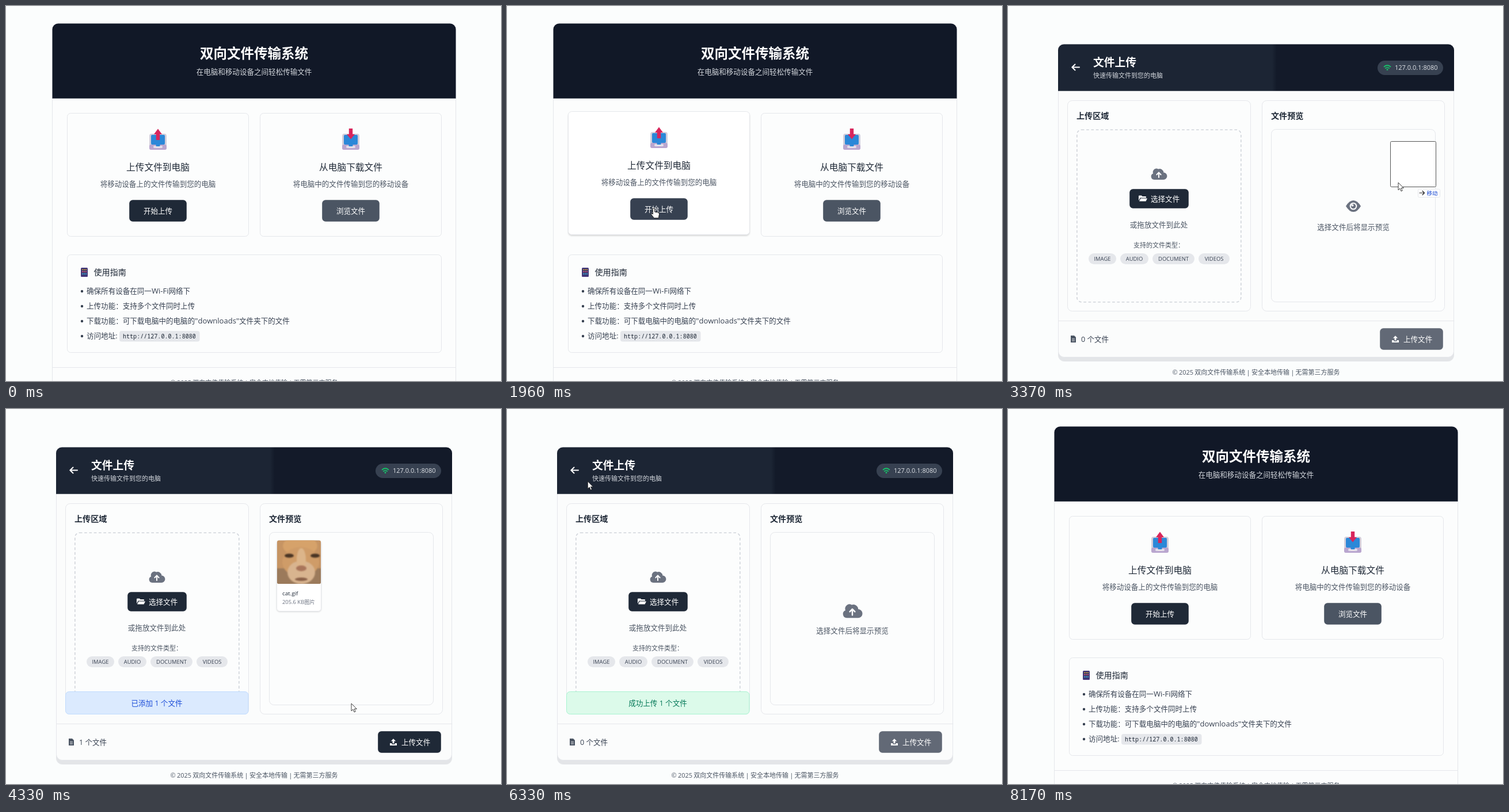
These frames come from a looping animation (860 px wide and 652 px high, 8.42 s). An HTML page:

```html
<!DOCTYPE html>
<html lang="zh-CN">
<head>
<meta charset="utf-8">
<title>双向文件传输系统</title>
<style>
html, body { margin: 0; width: 100%; height: 100%; overflow: hidden; background: #fbfdfd; }
svg { display: block; width: 860px; height: 652px; }
text { font-family: "Open Sans", "Noto Sans CJK SC", "Noto Sans CJK", sans-serif; font-kerning: none; white-space: pre; }
.mid { text-anchor: middle; }
.bold { font-weight: 700; }
.medium { font-weight: 500; }
.mono { font-family: "Noto Sans Mono", monospace; }
.foot { word-spacing: -0.6px; }
.lift { transform: translateY(-3px); }
.lift .box { fill: #fff; filter: drop-shadow(0 2.5px 1px #0002); }
.thumb { filter: drop-shadow(0 1px 1px #0002); }
.panel { filter: drop-shadow(0 7px 0.5px #e3e5e8); }
.soft { filter: blur(1.3px); }
</style>
</head>
<body>
<svg id="stage" viewBox="0 0 860 652"></svg>
<script>
const LOOP = 8420;
const INK = '#1f2937', BODY = '#374151', SOFT = '#4b5563', GREY = '#6b7280', LINE = '#e5e7eb';

// Text placed by its vertical centre.
const text = (x, cy, size, str, fill, cls = '', id = '') =>
  `<text id="${id}" class="${cls}" x="${x}" y="${cy + size * 0.375}" font-size="${size}" fill="${fill}">${str}</text>`;
const rect = (x, y, w, h, r, fill, more = '') =>
  `<rect x="${x}" y="${y}" width="${w}" height="${h}" rx="${r}" fill="${fill}" ${more}/>`;
const frame = (x, y, w, h, r, fill = '#fcfdfd', more = '') =>
  rect(x + 0.5, y + 0.5, w, h, r, fill, `stroke="${LINE}" ${more}`);
const button = (id, x, y, w, h, fill) => rect(x + 0.2, y + 0.2, w - 0.4, h - 0.4, 6, fill, `id="${id}"`);
const path = (d, fill, more = '') => `<path d="${d}" fill="${fill}" ${more}/>`;
const stroke = (d, color, width) =>
  path(d, 'none', `stroke="${color}" stroke-width="${width}" stroke-linecap="round" stroke-linejoin="round"`);
const ellipse = (x, y, rx, ry, fill) => `<ellipse cx="${x}" cy="${y}" rx="${rx}" ry="${ry}" fill="${fill}"/>`;
const at = (x, y, inner, scale = 1) => `<g transform="translate(${x} ${y}) scale(${scale})">${inner}</g>`;
const group = (id, inner) => `<g id="${id}">${inner}</g>`;
const header = (x, y, w, h, fill) =>
  path(`M${x} ${y + h}v${10 - h}a10 10 0 0 1 10-10h${w - 20}a10 10 0 0 1 10 10v${h - 10}z`, fill);

const computer = arrow =>
  rect(-15, -10, 30, 28, 4, '#d3cfdb') + rect(-15, 9, 30, 9, 3, '#b9a6cf') +
  rect(-12, -8, 24, 17, 2, '#2b88d8') + rect(-8, 11, 16, 4, 2, '#e4e0ea') +
  rect(-3.5, 8, 7, 4, 1, '#2b88d8') + path(arrow, '#d8265c');
const cloud = path('M-8 10a5.6 5.6 0 0 1-1.8-10.8A6.2 6.2 0 0 1-1-8.6 7 7 0 0 1 8.4-2.4 6.2 6.2 0 0 1 8 10z', GREY) +
  stroke('M0 6V-2M-3.6 1.2L0-2.6 3.6 1.2', '#fff', 2);
const eye = path('M-13 0Q-7-10 0-10T13 0Q7 10 0 10T-13 0z', GREY) +
  ellipse(0, 0, 6.3, 6.3, '#fff') + ellipse(0, 0, 4.3, 4.3, GREY) + ellipse(-1.6, -1.6, 2, 2, '#fff');
const folder = path('M-7 4V-4q0-1 1-1h4l1.5 1.5H5q1 0 1 1V-1H-4.5zM-6 5l2.5-5H8L5.5 5z', '#fff');
const upload = path('M-1.4 2V-2H-4.2L0-6.3 4.2-2H1.4V2zM-6 1.5h3.4v2h5.2v-2H6V5.5H-6z', '#fff');
const sheet = path('M-4.5-6H1.5L4.5-3V6H-4.5z', SOFT) + stroke('M-2 0H2M-2 3H2', '#fff', 1);
const wifi = stroke('M-5.5-1.5Q0-6 5.5-1.5M-3.2 1.2Q0-1.2 3.2 1.2', '#16c46a', 1.7) +
  ellipse(0, 3.7, 1.4, 1.4, '#16c46a');
const phone = rect(-6, -8, 12, 16, 1.5, '#4b3b80') + rect(-4.5, -6.5, 9, 12, 0, '#2d3568') +
  ['#e8a33b', '#e85a7a', '#58b4e8'].map((c, i) =>
    [0, 1, 2].map(j => rect(-3.8 + j * 2.9, -5.5 + i * 3.6, 1.9, 2, 0.4, c)).join('')).join('');

// A soft face in the photo's main tones.
const cat = `<g clip-path="url(#photo)">${rect(471, 228, 76, 76, 0, '#c69463')}<g class="soft">` +
  rect(466, 277, 86, 32, 0, '#9b7a5b') + ellipse(511, 238, 30, 17, '#d6a26a') +
  ellipse(512, 266, 32, 26, '#cf9c68') + ellipse(513, 284, 24, 20, '#d8b48f') +
  ellipse(513, 262, 8, 20, '#dcb58a') + ellipse(492, 255, 8, 3.6, '#4a3524') + ellipse(537, 255, 8, 3.6, '#4a3524') +
  ellipse(513, 277, 9, 5, '#a9755a') + ellipse(513, 296, 11, 3, '#8a6048') + '</g></g>';

const card = (id, x, arrow, title, desc, label, fill) => group(id,
  frame(x, 186, 315, 214, 6, '#fcfdfd', 'class="box"') + at(x + 158, 232, computer(arrow)) +
  text(x + 158, 280, 15.7, title, INK, 'mid') + text(x + 158, 309.5, 12.55, desc, SOFT, 'mid') +
  button(id + 'Btn', x + 108, 337, 100, 38, fill) + text(x + 158, 356.5, 12.55, label, '#fff', 'mid'));

const footer = cy => text(431, cy, 11, '© 2025 双向文件传输系统 | 安全本地传输 | 无需第三方服务', SOFT, 'mid foot');

const guide = ['确保所有设备在同一Wi-Fi网络下', '上传功能：支持多个文件同时上传',
  '下载功能：可下载电脑中的电脑的"downloads"文件夹下的文件', '访问地址:']
  .map(s => s.replace(/[\w"-]+/, '<tspan font-size="13">$&</tspan>'));

const home = frame(80, 30, 701, 640, 10) + header(80.5, 30.5, 701, 130.2, '#111827') +
  stroke('M81 628.5H781', LINE, 1) +
  text(431, 82, 23.5, '双向文件传输系统', '#fff', 'mid bold') +
  text(431, 114.5, 12.55, '在电脑和移动设备之间轻松传输文件', '#d1d5db', 'mid') +
  card('up', 106, 'M0-18.5L7-9H3.2V1H-3.2V-9H-7z', '上传文件到电脑', '将移动设备上的文件传输到您的电脑', '开始上传', INK) +
  card('down', 441, 'M0-.5L7-9H3.2V-19H-3.2V-9H-7z', '从电脑下载文件', '将电脑中的文件传输到您的移动设备', '浏览文件', SOFT) +
  frame(106, 432, 650, 170, 6) + at(136, 463, phone) + text(152.5, 463, 14.1, '使用指南', INK) +
  guide.map((s, i) => ellipse(132, 496 + i * 26, 2.2, 2.2, BODY) + text(140, 495.5 + i * 26, 12.55, s, BODY)).join('') +
  rect(197, 565, 139.5, 18.5, 4, LINE) + text(203, 574, 10.07, 'http://127.0.0.1:8080', INK, 'mono') +
  footer(655);

const tags = [['IMAGE', 140, 48], ['AUDIO', 195, 49], ['DOCUMENT', 251, 73], ['VIDEOS', 331, 54]];

const transfer = frame(87, 67, 687, 543, 10, '#fbfcfc', 'class="panel"') +
  header(87, 66.5, 688, 81.3, 'url(#bar)') +
  stroke('M124 106.5H111.5M116.5 101.5L111.3 106.5l5.2 5', '#fff', 2) +
  text(148, 98, 18.8, '文件上传', '#fff', 'bold') + text(148, 121, 11, '快速传输文件到您的电脑', '#d1d5db') +
  rect(642, 95, 114, 25, 12.5, BODY) + at(659, 107, wifi) + text(672, 107, 11, '127.0.0.1:8080', '#dfe2e7') +
  frame(103, 164, 318, 366, 8) + frame(441, 164, 317, 366, 8) +
  text(119, 191, 14.1, '上传区域', INK, 'bold') + text(457, 191, 14.1, '文件预览', INK, 'bold') +
  rect(119.8, 215.2, 285, 299.5, 8, 'none', 'stroke="#d1d5db" stroke-width="1.6" stroke-dasharray="4.7 3.6"') +
  frame(457, 214, 285, 300, 8) +
  at(262, 292, cloud) + button('pickBtn', 211, 318, 103, 34, INK) + at(234, 334.5, folder) +
  text(248, 335, 12.55, '选择文件', '#fff') +
  text(262, 380, 12.55, '或拖放文件到此处', SOFT, 'mid') + text(262, 416, 11, '支持的文件类型：', SOFT, 'mid') +
  tags.map(([s, x, w]) => rect(x, 430, w, 19, 9.5, LINE) + text(x + w / 2, 439.5, 9.4, s, BODY, 'mid')).join('') +
  group('empty', at(600, 348, eye) + text(600, 384, 12.55, '选择文件后将显示预览', SOFT, 'mid')) +
  group('cleared', at(600, 351, cloud, 1.22) + text(600, 385, 12.55, '选择文件后将显示预览', SOFT, 'mid')) +
  group('loaded', frame(470, 228, 77, 123, 5, '#fff', 'class="thumb"') + cat +
    text(480, 320, 9.8, 'cat.gif', INK, 'medium') + text(480, 335.5, 9.4, '205.6 KB图片', GREY)) +
  group('note', rect(103.5, 491.5, 317.5, 39, 6, '', 'id="noteBox"') + text(262, 511, 12.55, '', '', 'mid', 'noteText')) +
  stroke('M88 547.5H775', LINE, 1) + at(113.5, 579, sheet) + text(127, 579, 12.55, '', BODY, '', 'count') +
  button('sendBtn', 646, 560, 110, 38, INK) + at(673, 579.5, upload) +
  text(687, 579, 12.55, '上传文件', '#fff') + footer(637);

const cursor =
  group('drag', rect(-13.5, -71.5, 79, 79, 2, '#fff', 'stroke="#555"') +
    rect(34.5, 11.5, 38, 14, 2, '#fff', `stroke="${LINE}"`) +
    stroke('M37 18h8.5M42 14.5L45.5 18 42 21.5', '#222', 1.1) + text(49.5, 18, 9.5, '移动', '#1546d0')) +
  group('arrow', path('M0 0V13L3 10.2 5 15 7.2 14 5.2 9.5H9.3z', '#fff', 'stroke="#111" stroke-width=".8"')) +
  group('hand', path('M-1.6 10V1.2a1.6 1.6 0 0 1 3.2 0V6l6 1.2q2 .5 2 2.5l-1 5v2H.5l-5-6.5q0-1.8 1.8-1.2z',
    '#fff', 'stroke="#111" stroke-width=".9"')) +
  group('block', '<circle r="5.4" fill="#fff" stroke="#c81e1e" stroke-width="2.2"/>' + stroke('M-3.5-3.5L3.5 3.5', '#c81e1e', 2.2));

stage.innerHTML = `<defs><linearGradient id="bar">
  <stop offset=".54" stop-color="#1c2534"/><stop offset=".552" stop-color="#131a29"/></linearGradient>
  <clipPath id="photo">${rect(471, 228.5, 76, 75.5, 3, '#000')}</clipPath></defs>` +
  group('home', home) + group('transfer', transfer) + group('cursor', cursor);

const el = id => document.getElementById(id);
const show = (id, on) => el(id).setAttribute('display', on ? 'inline' : 'none');
const paint = (id, fill) => el(id).setAttribute('fill', fill);

// The picture advances in even steps: [first, last, count].
const steps = [[0, 0, 1], [760, 1600, 8], [1720, 1960, 3], [2110, 2360, 3], [2510, 2810, 3], [3370, 4210, 8],
  [4330, 5060, 7], [5190, 5940, 7], [6070, 6460, 4], [6710, 6710, 1], [6980, 7490, 5], [7640, 7640, 1], [7790, 8170, 4]]
  .flatMap(([a, b, n]) => Array.from({ length: n }, (_, i) => a + (n > 1 ? (b - a) * i / (n - 1) : 0)));

// Pointer path: time, x, y.
const route = [[760, 735, 620], [1000, 640, 500], [1240, 545, 360], [1600, 340, 306], [1960, 255, 352],
  [2110, 255, 352], [2360, 276, 364], [2510, 271, 352], [2660, 498, 441], [3370, 678, 307], [3850, 300, 400],
  [3970, 300, 400], [4330, 600, 512], [4700, 702, 577], [5190, 702, 577], [5940, 219, 191], [6460, 114, 104],
  [6710, 112, 105], [7490, 429, 386], [7640, 620, 501], [8050, 804, 637]];

function pointer(t) {
  const i = route.findIndex(p => p[0] > t);
  if (i < 0) return route.at(-1).slice(1);
  if (i === 0) return route[0].slice(1);
  const [a, b] = [route[i - 1], route[i]], k = (t - a[0]) / (b[0] - a[0]);
  return [a[1] + (b[1] - a[1]) * k, a[2] + (b[2] - a[2]) * k];
}

function draw(ms) {
  const t = steps.findLast(s => s <= ms);
  const [x, y] = pointer(t);
  const visible = t >= 760 && t < 8170 && !(t >= 2810 && t < 3370);
  const over = (l, top, w, h) => visible && x >= l && x < l + w && y >= top && y < top + h;
  const onTransfer = t >= 2110 && t < 6710;
  const dragging = t >= 3370 && t < 3970, added = t >= 3970 && t < 5190, sent = t >= 5190;

  show('home', !onTransfer);
  show('transfer', onTransfer);
  el('transfer').setAttribute('opacity', t < 2200 ? 0.5 : t < 2360 ? 0.95 : 1);

  for (const [id, left] of [['up', 106], ['down', 441]])
    el(id).setAttribute('class', !onTransfer && over(left, 186, 316, 215) ? 'lift' : '');
  const onStart = !onTransfer && over(214, 334, 100, 41);
  const onBrowse = !onTransfer && over(549, 334, 100, 41);
  paint('upBtn', onStart ? BODY : INK);
  paint('downBtn', onBrowse ? GREY : SOFT);

  show('empty', !added && !sent);
  show('loaded', added);
  show('cleared', sent);
  show('note', added || sent);
  paint('noteBox', sent ? '#dcfaea' : '#dbeafe');
  el('noteBox').setAttribute('stroke', sent ? '#a7f3d0' : '#bfdbfe');
  paint('noteText', sent ? '#047857' : '#1d4ed8');
  el('noteText').textContent = sent ? '成功上传 1 个文件' : '已添加 1 个文件';
  el('count').textContent = (added ? 1 : 0) + ' 个文件';

  const onSend = onTransfer && over(646, 560, 110, 38);
  const onPick = onTransfer && !dragging && over(211, 318, 103, 34);
  const onBack = onTransfer && over(104, 96, 26, 22);
  paint('sendBtn', !added ? '#626976' : onSend ? BODY : INK);
  paint('pickBtn', onPick ? BODY : INK);

  const blocked = onSend && !added && !dragging;
  const hand = !blocked && (onStart || onBrowse || onSend || onPick || onBack);
  show('cursor', visible);
  show('drag', dragging);
  show('block', blocked);
  show('hand', hand);
  show('arrow', !blocked && !hand);
  el('cursor').setAttribute('transform', `translate(${x} ${y})`);
}

const start = performance.now();
function tick() {
  draw((performance.now() - start) % LOOP);
  requestAnimationFrame(tick);
}
tick();
</script>
</body>
</html>
```
